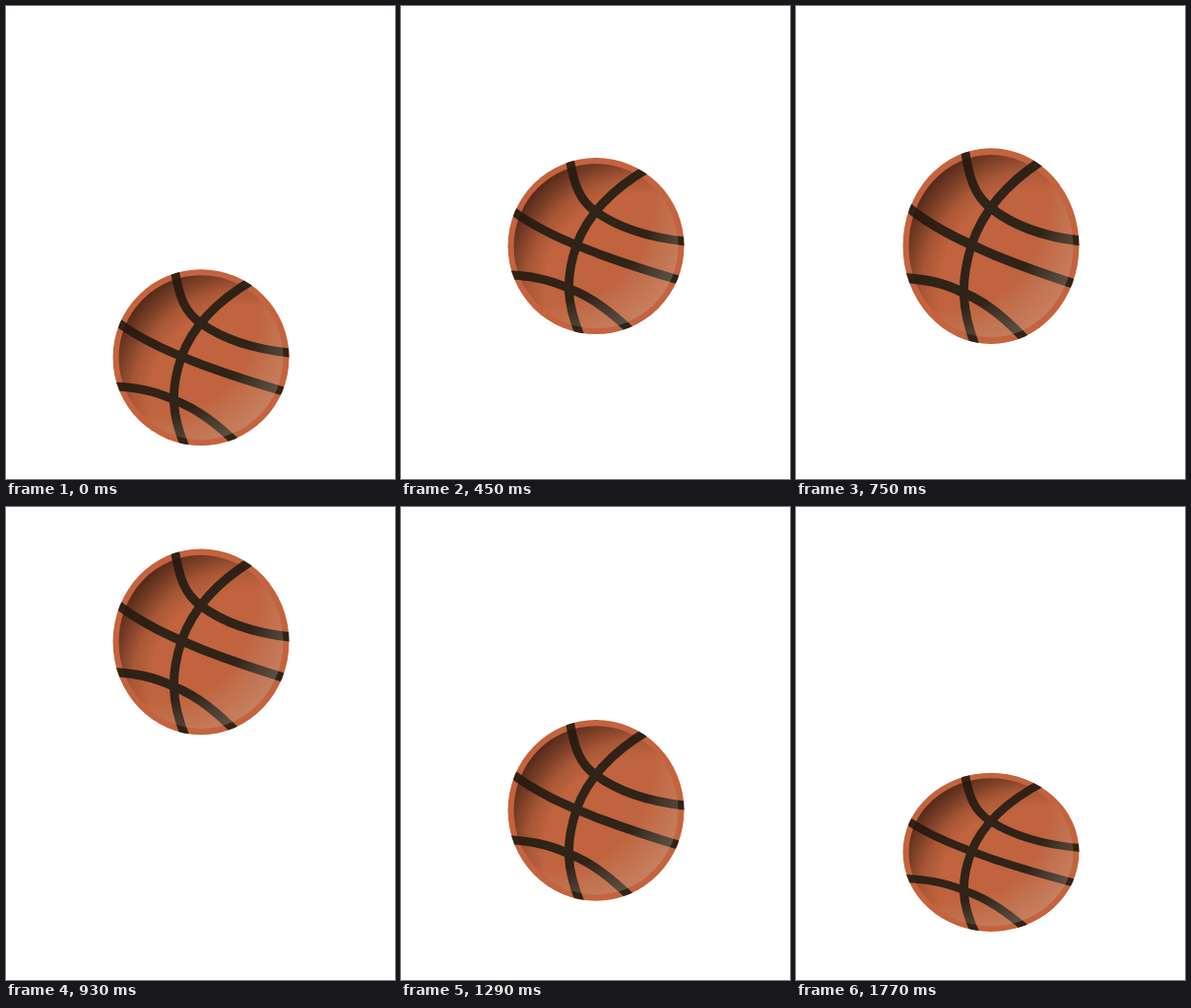
Recreate the animation shown at these times as an HTML page. Size 395 by 480 pixels, loop 1.8 s.

```html
<!DOCTYPE html>
<html lang="en">
<head>
<meta charset="utf-8">
<title>Bouncing basketball</title>
<style>
  html, body { margin: 0; width: 100%; height: 100%; overflow: hidden; background: #fff; }
  svg { display: block; width: 100%; height: 100%; }
  .seams { fill: none; stroke: #302318; stroke-width: 8.9; }
</style>
</head>
<body>
<svg viewBox="0 0 395 480">
  <defs>
    <clipPath id="edge"><circle r="89.5"/></clipPath>
    <radialGradient id="shade" gradientUnits="userSpaceOnUse" cx="45" cy="45" r="148">
      <stop offset=".66" stop-color="#2a140b" stop-opacity="0"/>
      <stop offset=".78" stop-color="#2a140b" stop-opacity=".16"/>
      <stop offset=".88" stop-color="#2a140b" stop-opacity=".44"/>
      <stop offset="1" stop-color="#2a140b" stop-opacity=".74"/>
    </radialGradient>
    <radialGradient id="shine" gradientUnits="userSpaceOnUse" cx="-45" cy="-45" r="148">
      <stop offset=".69" stop-color="#d2c2b0" stop-opacity="0"/>
      <stop offset=".82" stop-color="#d2c2b0" stop-opacity=".14"/>
      <stop offset="1" stop-color="#d2c2b0" stop-opacity=".3"/>
    </radialGradient>
  </defs>
  <g id="ball">
    <g clip-path="url(#edge)">
      <circle r="90" fill="#c4633e"/>
      <circle r="83.5" fill="#c0633e"/>
      <g class="seams" transform="translate(-198.3 -355.900)">
        <path d="M171 264C176 295 182 310 198 321C222 338 255 348 292 351.5"/>
        <path d="M250.500 277.500C208.500 302 188.500 328 178.500 355C166.500 390 168.500 415 183.500 450"/>
        <path d="M110 317.500C140 340.500 175 353.500 200 363.500C230 374.500 255 382.500 288 392"/>
        <path d="M106 385C130 386 150 389 171 399C195 408 215 424 236 444"/>
      </g>
      <circle r="83.5" fill="url(#shade)"/>
      <circle r="83.5" fill="url(#shine)"/>
    </g>
  </g>
</svg>
<script>
  const LOOP = 1800, BOUNCE = 600, STEP = 30;
  const LOW = 356.7, HIGH = 130.5;
  const ball = document.getElementById('ball');

  // [time within the bounce, vertical stretch]
  const firstStretch = [[0, 1], [510, 1], [570, .9], [600, .9]];
  const laterStretch = [[0, .9], [150, 1.11], [510, 1], [570, .9], [600, .9]];

  const smooth = p => p * p * (3 - 2 * p);

  function sample(keys, t) {
    const i = keys.findIndex(key => key[0] > t);
    const [t0, a] = keys[i - 1], [t1, b] = keys[i];
    return a + (b - a) * (t - t0) / (t1 - t0);
  }

  function draw(now) {
    const time = Math.floor((now % LOOP) / STEP) * STEP;
    const t = time % BOUNCE;
    const rise = 1 - Math.abs(t / (BOUNCE / 2) - 1);
    const y = LOW + (HIGH - LOW) * smooth(rise);
    const stretch = sample(time < BOUNCE ? firstStretch : laterStretch, t);
    ball.setAttribute('transform', `translate(198 ${y}) scale(1 ${stretch})`);
  }

  const start = performance.now();
  function tick() {
    draw(performance.now() - start);
    requestAnimationFrame(tick);
  }
  tick();
</script>
</body>
</html>
```
